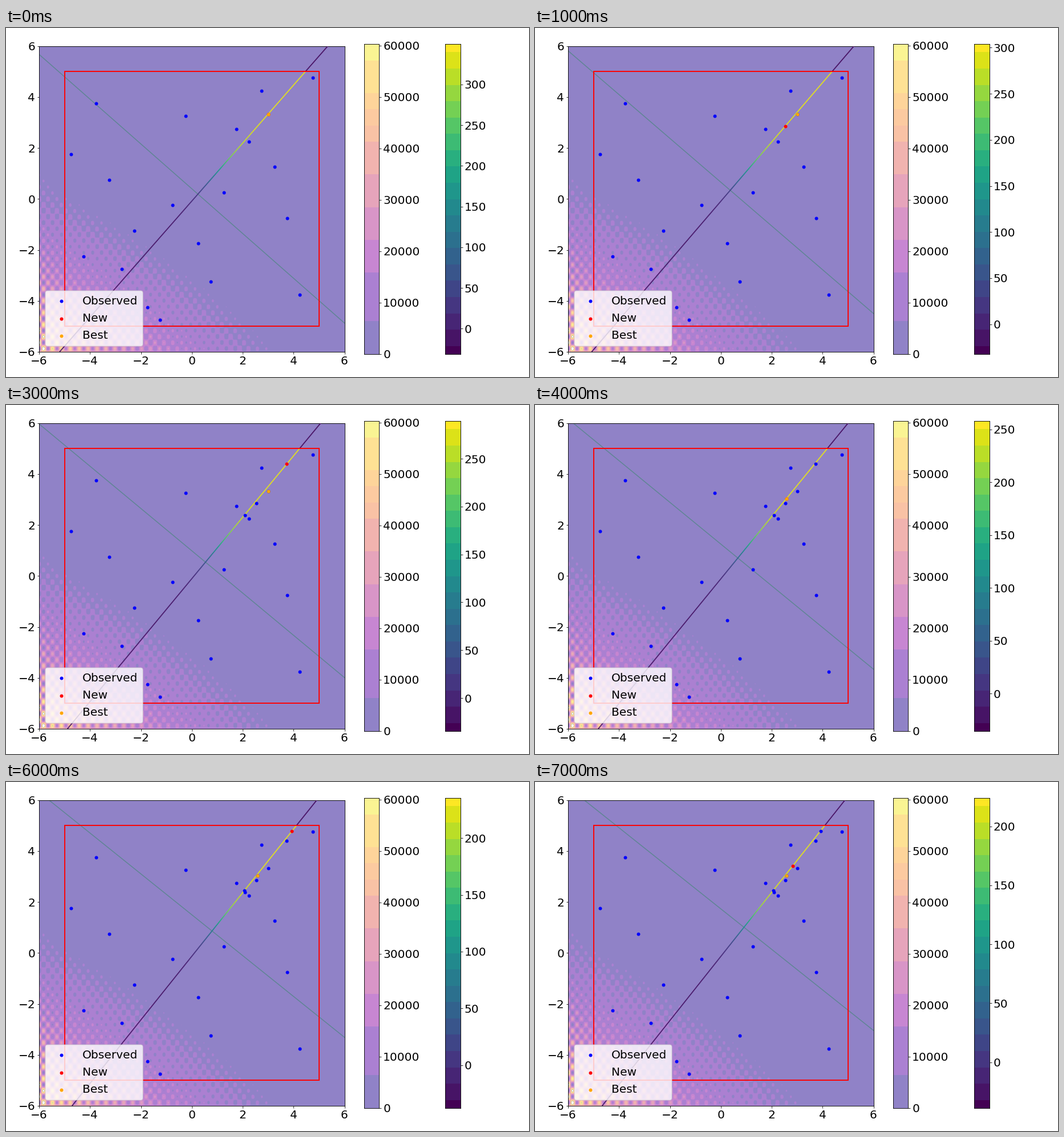
Animation of 917 by 611 pixels, one loop 8 s. Source, as a matplotlib script:

```python
import numpy as np
import matplotlib.pyplot as plt
from matplotlib.animation import FuncAnimation
from matplotlib.collections import LineCollection
from matplotlib.colors import BoundaryNorm, ListedColormap
from matplotlib.patches import FancyBboxPatch, Rectangle
from matplotlib.ticker import MultipleLocator

W, H, DPI = 917, 611, 64
PT = 72 / DPI  # points per pixel
STEPS = 8
plt.rcParams.update({"font.family": "DejaVu Sans", "font.size": 20.1 * PT,
                     "axes.linewidth": 0.9 * PT})

# Objective bands: edges in nineteenths of the range, half-transparent plasma
TOP = 60330
EDGES = np.array([0, 2, 5, 7, 9, 11, 13, 14, 15, 16, 18, 19]) / 19
SHADES = EDGES[:-1] + 0.3 * np.diff(EDGES)
CMAP = ListedColormap(0.5 + 0.5 * plt.cm.plasma(SHADES)[:, :3])
NORM = BoundaryNorm(EDGES * TOP, len(SHADES))

# Latin hypercube: one point in each row and column
COLUMNS = np.array([19, 15, 2, 9, 13, 14, 0, 16, 3, 12,
                    8, 17, 5, 10, 1, 4, 11, 18, 6, 7])
START = np.column_stack([COLUMNS / 2 - 4.75, np.linspace(4.75, -4.75, 20)])


def objective(x, y):
    """Rising slope toward the lower left, covered in fine ripples."""
    g = np.maximum(-0.716 * x - y + 0.03 * (x + 6) * (y + 6), 0)
    trend = 4000 * (g / 3.6) ** 2.2
    depth = 0.55 + 0.6 * np.exp(-(x + 6) / 0.35)
    ripple = np.cos(2 * np.pi * (x + 6) / 0.35) * np.cos(2 * np.pi * y / 0.47)
    value = trend * (1 + depth * ripple)
    return np.where(value < TOP, value, np.nan)


def slope(i):
    return 0.765 + 0.1135 * 0.828 ** i


def line_x(i, y):
    """Search line at step i; it turns and drifts as points are added."""
    return 0.075 + 0.005 * i + slope(i) * y


def line_value(y):
    inside = 0.06 + 0.9 / (1 + np.exp(-(y - 1.05) / 0.42))
    return np.where(y > 5, 0.04, inside)


# Each new sample lies on the search line of its step
FOUND = np.array([(line_x(i, y), y) for i, y in enumerate(
    [3.33, 2.86, 2.39, 4.39, 3.03, 2.44, 4.77, 3.41])])
BEST_STEP = 4


def add_axes(left, top, right, bottom):
    return fig.add_axes([left / W, 1 - bottom / H,
                         (right - left) / W, (bottom - top) / H])


def style_ticks(ax, step):
    ax.tick_params(length=3.5 * PT, width=0.8 * PT, pad=3.2 * PT)
    ax.yaxis.set_major_locator(MultipleLocator(step))


def add_bar(left, step):
    ax = add_axes(left, 28, left + 27, 570.5)
    ax.yaxis.tick_right()
    style_ticks(ax, step)
    return ax


def dots(color, z):
    return ax.plot([], [], "o", color=color, ms=6 * PT, mew=0, zorder=z)[0]


fig = plt.figure(figsize=(W / DPI, H / DPI), dpi=DPI, facecolor="white")

ax = add_axes(58, 31.5, 593.5, 567)
style_ticks(ax, 2)
ax.xaxis.set_major_locator(MultipleLocator(2))
gx, gy = np.meshgrid(*[np.linspace(-6, 6, 1605)] * 2)
ax.imshow(objective(gx, gy), cmap=CMAP, norm=NORM, origin="lower",
          extent=(-6, 6, -6, 6), aspect="auto", interpolation_stage="rgba")
ax.set(xlim=(-6, 6), ylim=(-6, 6))

cross, = ax.plot([], [], color="#5f8594", lw=1.5 * PT, zorder=2)
ys = np.linspace(-6, 6, 241)
search = LineCollection([], linewidths=1.8 * PT, zorder=3)
search.set_color(plt.cm.viridis(line_value((ys[1:] + ys[:-1]) / 2)))
ax.add_collection(search, autolim=False)
ax.add_patch(Rectangle((-5, -5), 10, 10, fill=False, ec="red",
                       lw=1.9 * PT, zorder=4))
observed, new, best = dots("blue", 5), dots("red", 6), dots("orange", 7)

# Legend, laid out in stage pixels
key = add_axes(0, 0, W, H)
key.set(xlim=(0, W), ylim=(H, 0))
key.axis("off")
key.add_patch(FancyBboxPatch((73, 464), 163, 89, fc="white", ec="#cccccc",
                             boxstyle="round,pad=4,rounding_size=4",
                             lw=1 * PT, alpha=0.8))
for row, (name, color) in enumerate([("Observed", "blue"), ("New", "red"),
                                     ("Best", "orange")]):
    key.plot(97, 478.3 + 30.4 * row, "o", color=color, ms=6 * PT, mew=0)
    key.text(133.5, 484 + 30.2 * row, name)

bar = add_bar(627.5, 10000)
bar.pcolormesh([0, 1], EDGES * TOP, EDGES[:-1, None] * TOP,
               cmap=CMAP, norm=NORM)
bar.set(xlim=(0, 1), ylim=(0, TOP), xticks=[])

value_bar = add_bar(770, 50)
bands = value_bar.imshow(np.linspace(0, 1, 20)[:, None], cmap="viridis",
                         origin="lower", aspect="auto",
                         interpolation="nearest")
value_bar.set(xlim=(0, 1), xticks=[])


def update(i):
    points = np.column_stack([line_x(i, ys), ys])
    search.set_segments(np.stack([points[:-1], points[1:]], axis=1))

    # The cross line runs through the centre of all earlier samples
    seen = np.vstack([START, FOUND[:i]])
    cx, cy = (seen.sum(axis=0) + 20 * 0.213) / len(seen)
    ends = np.array([-6, 6])
    cross.set_data(ends, cy - slope(i) * (ends - cx))

    observed.set_data(*seen.T)
    new.set_data(*FOUND[i:i + 1].T)
    top = BEST_STEP if i >= BEST_STEP else 0
    best.set_data(*FOUND[top:top + 1].T)

    # Value scale shrinks; the end bands show only half their height
    low = -31 - 1.1 * i
    high = np.interp(i, [0, 1, 3, 4, 7], [349.7, 304, 289.4, 258, 224])
    half = (high - low) / 38
    bands.set_extent((0, 1, low - half, high + half))
    value_bar.set(xlim=(0, 1), ylim=(low, high))
    return search, cross, observed, new, best, bands


anim = FuncAnimation(fig, update, frames=STEPS, interval=1000,
                     init_func=lambda: update(0), repeat=True, repeat_delay=0)
plt.show()
```
